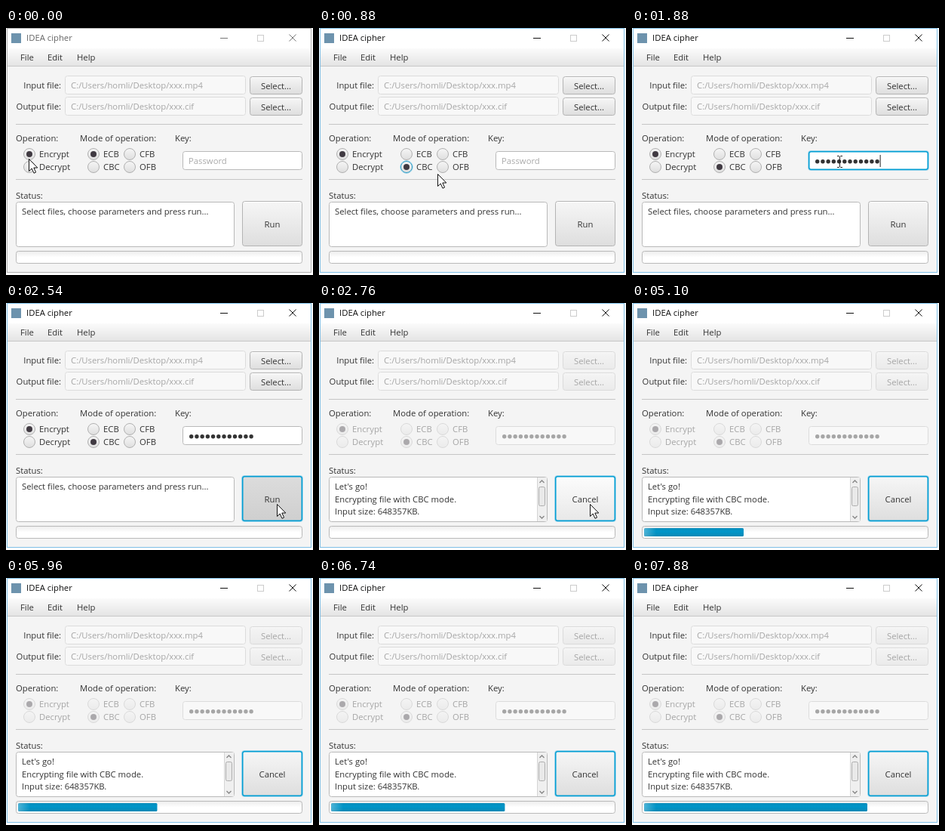
Animation of 407x327 px, one loop 8 s. Source, as an HTML page:

```html
<!DOCTYPE html>
<html lang="en">
<head>
<meta charset="utf-8">
<title>IDEA cipher</title>
<style>
  html, body { margin: 0; width: 100%; height: 100%; overflow: hidden; background: #fff; }
  svg { display: block; width: 407px; height: 327px; }
  text { font: 11.3px "Open Sans", "Noto Sans", sans-serif; fill: #333; white-space: pre; }
</style>
</head>
<body>
<svg viewBox="0 0 407 327">
  <defs>
    <linearGradient id="btn" x2="0" y2="1"><stop stop-color="#f6f6f6"/><stop offset="1" stop-color="#dedede"/></linearGradient>
    <linearGradient id="hover" x2="0" y2="1"><stop stop-color="#fcfcfc"/><stop offset="1" stop-color="#e8e8e8"/></linearGradient>
    <linearGradient id="down" x2="0" y2="1"><stop stop-color="#dcdcdc"/><stop offset="1" stop-color="#cfcfcf"/></linearGradient>
    <linearGradient id="menu" x2="0" y2="1"><stop stop-color="#fbfbfb"/><stop offset="1" stop-color="#e4e4e4"/></linearGradient>
    <linearGradient id="track" x2="0" y2="1"><stop stop-color="#ececec"/><stop offset=".5" stop-color="#fff"/></linearGradient>
    <linearGradient id="bar" x2="0" y2="1"><stop stop-color="#0b8dbb"/><stop offset=".4" stop-color="#0096c9"/><stop offset="1" stop-color="#0788b5"/></linearGradient>
    <linearGradient id="fade"><stop stop-color="#fff" stop-opacity=".3"/><stop offset="1" stop-color="#fff" stop-opacity="0"/></linearGradient>
  </defs>
  <g id="ui"></g>
</svg>
<script>
const ui = document.getElementById('ui');
const LOOP = 8000, STEP = 110.5, LAST = 71;
const BLUE = '#039ed3';
const CLICK_CBC = 5, FOCUS_KEY = 12, PRESS_RUN = 23, START = 25, CURSOR_GONE = 28;

// Pointer stops: step, x, y
const path = [[0, 30, 173], [4, 116, 183], [6, 120, 186], [8, 157, 193],
              [11, 275, 177], [18, 275, 177], [23, 359, 266], [LAST, 359, 266]];

const clamp = (v, lo, hi) => Math.min(hi, Math.max(lo, v));
const attrs = o => Object.entries(o).map(([k, v]) => `${k}="${v}"`).join(' ');
const rect = (x, y, w, h, fill, more = {}) =>
  `<rect ${attrs({ x, y, width: w, height: h, fill, ...more })}/>`;
const line = (d, stroke, width = 1) =>
  `<path d="${d}" fill="none" stroke="${stroke}" stroke-width="${width}"/>`;
const text = (x, y, s, more = {}) => `<text ${attrs({ x, y, ...more })}>${s}</text>`;
const dim = (on, s) => `<g opacity="${on ? 0.4 : 1}">${s}</g>`;

// Rounded box with a thin border, or a thick blue one when focused
function box(x, y, w, h, fill, focus, border = '#b9b9b9') {
  return focus
    ? rect(x - .5, y - .5, w + 1, h + 1, 'none', { rx: 3.5, stroke: '#9fd6ec' }) +
      rect(x + .75, y + .75, w - 1.5, h - 1.5, fill, { rx: 2.5, stroke: BLUE, 'stroke-width': 1.5 })
    : rect(x + .5, y + .5, w - 1, h - 1, fill, { rx: 3, stroke: border });
}

function button(x, y, w, h, label, fill = 'btn', focus = false) {
  return box(x, y, w, h, `url(#${fill})`, focus, '#b4b4b4') +
    (focus ? '' : line(`M${x + 3} ${y + 1.5}h${w - 6}`, '#fff')) +
    text(x + w / 2, y + h / 2 + 4.5, label, { 'text-anchor': 'middle' });
}

function radio(x, y, label, on, focus) {
  const ring = focus ? `<circle cx="${x}" cy="${y}" r="8.3" fill="none" stroke="#9fd6ec"/>` : '';
  const dot = on ? `<circle cx="${x}" cy="${y}" r="4" fill="#403a42"/>` : '';
  return ring + `<circle cx="${x}" cy="${y}" r="7.5" fill="url(#btn)" stroke="${focus ? '#2b9cc6' : '#b0b0b0'}"/>` +
    dot + text(x + 13, y + 4, label);
}

function titleBar(active) {
  const ink = active ? '#111' : '#777';
  return rect(2, 1, 402, 26, '#fff') + rect(7, 7, 13, 13, '#6d93ad') +
    text(27, 17, 'IDEA cipher', { style: `fill:${active ? '#111' : '#666'}` }) +
    line('M284 13.5h10', ink) +
    rect(333.5, 9.5, 8, 8, 'none', { stroke: '#ccc' }) +
    line('M375.5 8.5l9 9m0-9l-9 9', ink);
}

function fileRow(y, label, name, busy) {
  return text(73, y + 17, label, { 'text-anchor': 'end' }) +
    dim(true, box(78, y, 240, 25, '#fff') + text(86, y + 17, `C:/Users/homli/Desktop/${name}`)) +
    dim(busy, button(323, y + 1, 70, 24, 'Select...'));
}

function keyField(k, busy) {
  const focus = k >= FOCUS_KEY && k < PRESS_RUN;
  const n = clamp((k - 13) * 3, 0, 12);
  let s = box(234, 163, 159, 25, '#fff', focus);
  if (!n && !focus) s += text(242, 180, 'Password', { style: 'fill:#aaa' });
  for (let i = 0; i < n; i++) s += `<circle cx="${245.7 + i * 7.22}" cy="176.7" r="2.7" fill="#333"/>`;
  if (focus && k !== 21) s += line(`M${242.5 + n * 7.22} 168v16`, '#222');
  return dim(busy, s);
}

function statusArea(busy) {
  const lines = busy
    ? ["Let's go!", 'Encrypting file with CBC mode.', 'Input size: 648357KB.']
    : ['Select files, choose parameters and press run...'];
  const bar = rect(289, 231, 13, 58, '#efefef') + line('M289.5 231v58', '#d4d4d4') +
    rect(291.5, 243.5, 8, 25, '#e9e9e9', { rx: 2, stroke: '#adadad' }) +
    line('M292.5 238l3-3 3 3M292.5 282l3 3 3-3', '#858585', 1.3);
  return box(13, 230, 290, 60, '#fff') + (busy ? bar : '') +
    lines.map((s, i) => text(21, 247 + i * 16.5, s)).join('');
}

function progress(k) {
  const w = 148 + (k - 46) * 6.56 - 16;
  return box(13, 295, 380, 17, 'url(#track)') +
    (k > START ? rect(16, 298, w, 11, 'url(#bar)', { rx: 1.5 }) +
      rect(16, 298, Math.min(w, 16), 11, 'url(#fade)') : '');
}

function pointer(k) {
  if (k >= CURSOR_GONE) return '';
  const i = path.findIndex((p, n) => k < path[n + 1][0]);
  const [a, b] = [path[i], path[i + 1]];
  const f = (k - a[0]) / (b[0] - a[0]);
  const x = Math.round(a[1] + (b[1] - a[1]) * f), y = Math.round(a[2] + (b[2] - a[2]) * f);
  const shape = x > 234 && y > 163 && y < 188
    ? line('M-3 -7.5h2.5l1 1 1-1h2.5M.5 -7v14M-3 7.5h2.5l1-1 1 1h2.5', '#222')
    : '<path d="M.5 .5V16.5L4.2 13 7 19.2 9.6 18 6.8 12H11.8Z" fill="#fff" stroke="#111"/>';
  return `<g transform="translate(${x} ${y})">${shape}</g>`;
}

function draw(k) {
  const active = k >= CLICK_CBC, busy = k >= START, cbc = k >= CLICK_CBC;
  const fill = k === PRESS_RUN || k === PRESS_RUN + 1 ? 'down' : k >= 22 && k < CURSOR_GONE ? 'hover' : 'btn';
  ui.innerHTML =
    rect(1.5, .5, 403, 323, '#f4f4f4', { stroke: active ? '#7fbfe6' : '#b0b0b0' }) +
    titleBar(active) +
    rect(2, 27, 402, 23, 'url(#menu)') + line('M2 50.5h402', '#c8c8c8') +
    text(19, 43, 'File') + text(55, 43, 'Edit') + text(94, 43, 'Help') +
    fileRow(63, 'Input file:', 'xxx.mp4', busy) +
    fileRow(91, 'Output file:', 'xxx.cif', busy) +
    line('M13 127.5h380M13 200.5h380', '#c6c6c6') +
    text(13, 150, 'Operation:') + text(98, 150, 'Mode of operation:') + text(224, 150, 'Key:') +
    dim(busy,
      radio(31, 167, 'Encrypt', true) + radio(31, 184, 'Decrypt') +
      radio(116, 167, 'ECB', !cbc) + radio(164, 167, 'CFB') +
      radio(116, 184, 'CBC', cbc, cbc && k < FOCUS_KEY) + radio(164, 184, 'OFB')) +
    keyField(k, busy) +
    text(13, 226, 'Status:') + statusArea(busy) +
    button(313, 229, 80, 60, busy ? 'Cancel' : 'Run', fill, k >= PRESS_RUN) +
    progress(k) + pointer(k);
}

let shown = -1;
function tick(now) {
  const k = Math.min(LAST, Math.floor((now % LOOP + 18) / STEP));
  if (k !== shown) draw(shown = k);
  requestAnimationFrame(tick);
}
tick(performance.now());
</script>
</body>
</html>
```
